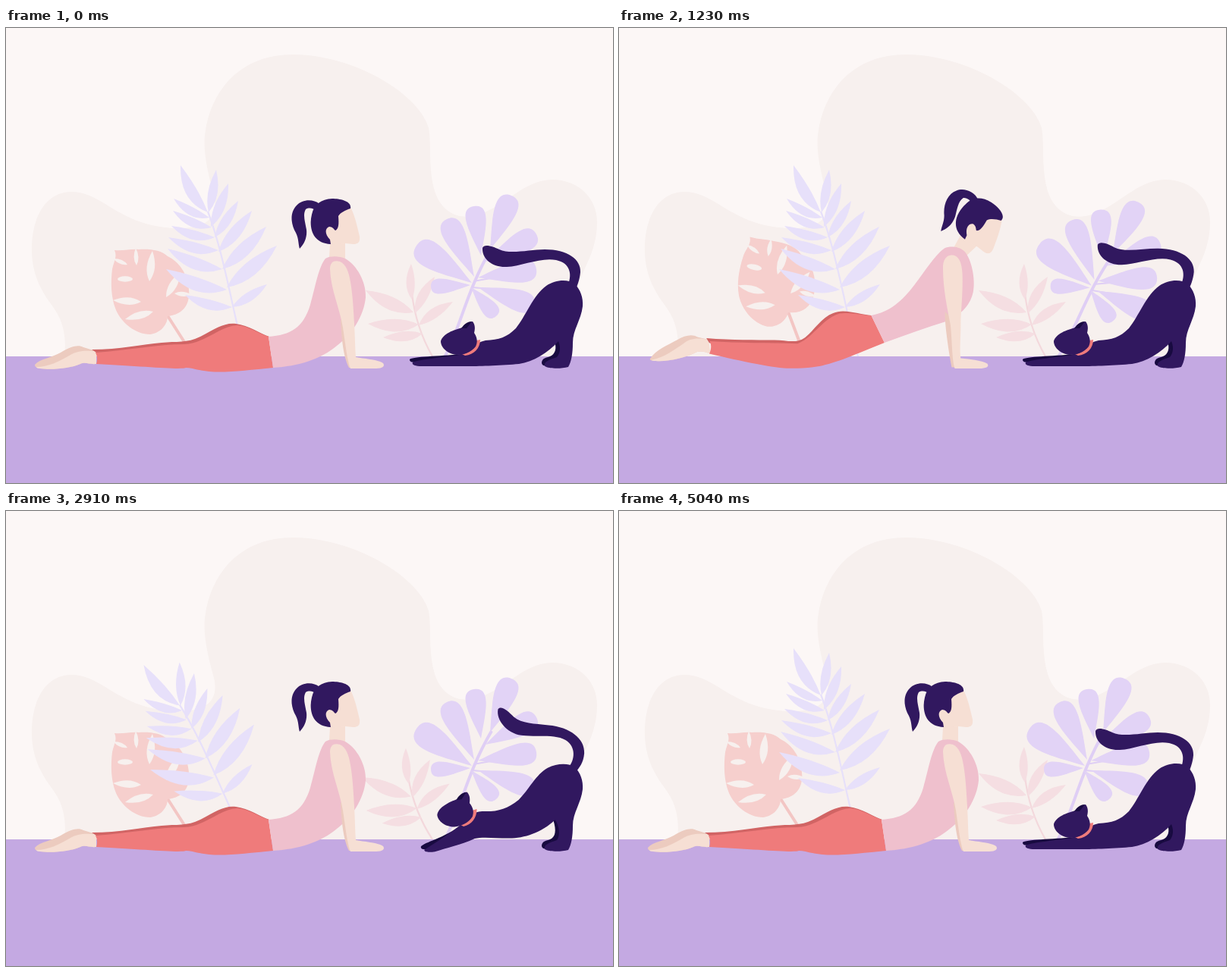
These frames come from a looping animation (800x600 px, 5070 ms). An HTML page:

```html
<!DOCTYPE html>
<html lang="en">
<head>
<meta charset="utf-8">
<title>Stretching together</title>
<style>
html, body { margin: 0; width: 100%; height: 100%; overflow: hidden; background: #fcf7f6 }
svg { display: block; width: 100%; height: 100% }
</style>
</head>
<body>
<svg viewBox="0 0 800 600">
  <path fill="#f7f0ee" d="M77 433C80 405 75 385 60 365C40 338 33 315 34 285C36 245 55 215 88 216C130 218 150 262 225 264C264 265 281 250 274 220C267 195 258 160 263 135C272 80 310 35 378 35C460 35 545 88 557 132C561 152 556 185 565 215C573 240 592 252 615 248C655 240 680 200 720 200C755 200 780 225 779 258C778 300 757 320 753 345L745 433Z"/>
  <g id="monstera" fill="#f6cfcd">
    <path d="M212 378L242 425" stroke="#f3c6c4" stroke-width="4"/>
    <path d="M143 293C155 294 165 291 175 292C190 291 205 293 213 301C228 308 240 325 241 345C243 362 235 378 213 380C213 390 205 402 190 404C170 404 152 388 145 372C138 355 138 335 140 318C142 308 147 302 143 293Z"/>
    <g id="cuts" fill="#f7f0ee"><ellipse cx="157" cy="331" rx="10" ry="3.7"/></g>
  </g>
  <g id="fern" fill="#e7e0fa">
    <path d="M315 433C300 380 288 300 266 242" fill="none" stroke="#e7e0fa" stroke-width="2.2"/>
  </g>
  <g id="sprig" fill="#f5dee2">
    <path d="M562 433C550 412 539 385 535 350" fill="none" stroke="#f3d8dc" stroke-width="2.2"/>
  </g>
  <g id="paddle" fill="#e2d3f6">
    <path d="M575 440C600 395 605 350 640 290" fill="none" stroke="#dfcef5" stroke-width="4"/>
    <path d="M614 342L650 345M616 334L650 328" fill="none" stroke="#dfcef5" stroke-width="2"/>
  </g>
  <path fill="#c4a9e2" d="M0 433H800V600H0Z"/>
  <g id="woman"></g>
  <g id="head">
    <path id="pony" fill="#31185f" d="M413 232C405 225 390 226 383 234C374 243 375 258 382 270C386 278 385 285 387 291C394 284 397 275 396 266C394 255 391 246 395 239C400 236 405 238 409 241Z"/>
    <path fill="#f6dfd4" d="M436 242L454 236C460 248 463 262 466 275C467 282 464 285 458 285L447 284L428 286L420 266Z"/>
    <path fill="#31185f" d="M454 238C456 228 440 225 430 225C415 226 406 232 403 246C399 262 403 284 428 285L427 279C420 272 420 264 426 262C430 262 432 265 434 267C438 265 439 260 438 248C441 243 448 240 454 238Z"/>
  </g>
  <g id="cat"></g>
  <g id="catHead">
    <path fill="#31185f" d="M573 413C576 403 590 398 602 395C605 391 609 388 615 387C619 392 618 398 617 402C621 408 622 414 619 420C613 428 603 431 594 431C583 430 573 422 573 413Z"/>
    <path fill="#180a40" d="M600 396C604 390 609 387 614 387L607 396Z"/>
  </g>
</svg>
<script>
const LOOP = 5070;
const $ = id => document.getElementById(id);

function addPath(parent, fill, d = '') {
  const el = document.createElementNS('http://www.w3.org/2000/svg', 'path');
  el.setAttribute('fill', fill);
  el.setAttribute('d', d);
  return parent.appendChild(el);
}

// A point at fraction k along root-tip, pushed sideways by s.
function along(x, y, X, Y, k, s) {
  const dx = X - x, dy = Y - y, n = s / Math.hypot(dx, dy);
  return `${(x + dx * k - dy * n).toFixed(1)} ${(y + dy * k + dx * n).toFixed(1)} `;
}

// Pointed leaf; a and b bend the two edges relative to its length.
function leaf([x, y, X, Y], a, b) {
  const len = Math.hypot(X - x, Y - y), at = s => along(x, y, X, Y, .43, s * len);
  return `M${x} ${y}Q${at(a)}${X} ${Y}Q${at(b)}${x} ${y}Z`;
}

// Round-tipped petal of width w.
function petal([x, y, X, Y, w]) {
  const at = (k, s) => along(x, y, X, Y, k, s * w);
  return `M${x} ${y}C${at(.45, .34)}${at(1, .88)}${X} ${Y}C${at(1, -.88)}${at(.45, -.34)}${x} ${y}Z`;
}

const rows = text => text.split(',').map(r => r.trim().split(' ').map(Number));
function leaves(id, text, a, b) {
  addPath($(id), $(id).getAttribute('fill'), rows(text).map(r => leaf(r, a, b)).join(''));
}

leaves('cuts', '172 313 171 290,189 334 193 294,160 312 141 304,178 361 141 359,194 374 157 384,211 355 230 322,222 350 245 352', .26, -.26);
leaves('fern', '266 243 230 181,268 250 221 225,271 263 220 241,275 276 218 261,280 293 214 276,285 318 213 291,291 345 211 318,298 368 236 352', .07, -.35);
leaves('fern', '267 243 277 187,270 262 293 205,275 276 306 228,280 295 324 241,285 318 343 262,291 342 357 287,298 368 344 338', .25, -.19);
leaves('sprig', '537 375 474 346,544 391 477 390,549 403 497 408', .2, -.3);
leaves('sprig', '535 358 534 311,539 376 565 328,544 392 589 361', .18, -.3);
addPath($('paddle'), '#e2d3f6', rows('614 336 541 287 36,617 328 581 252 31,626 300 617 235 28,638 292 666 221 31,632 308 699 272 30,622 329 699 318 31,622 342 696 366 30,613 342 646 380 22,612 339 560 341 21').map(petal).join(''));

const skin = '#f6dfd4', shade = '#eccbbf', dark = '#31185f', night = '#180a40', coral = '#ef7b7b';

// Each part: role, fill, resting pose, moved pose.
const parts = [
  // far foot, near foot
  ['woman', shade,
    'M38 444C45 436 60 435 72 428C85 420 95 417 102 421L115 425L119 443C110 444 105 440 98 443C85 449 60 451 45 449C39 448 38 446 38 444Z',
    'M42 433C50 420 65 412 78 405C88 399 97 398 104 402L118 405L121 424C113 420 110 420 104 421C90 429 65 436 50 435C44 435 42 435 42 433Z'],
  ['woman', skin,
    'M40 447C55 447 70 440 85 431C95 425 108 425 119 427L119 443C110 444 105 440 98 443C85 449 60 451 45 449C42 449 40 448 40 447Z',
    'M44 434C60 430 75 418 88 408C95 402 108 402 118 405L121 424C113 420 110 420 104 421C90 429 65 436 50 435C46 435 44 435 44 434Z'],
  // far leg, near leg
  ['woman', '#d16464',
    'M113 424C150 424 180 417 205 415C225 413 240 416 258 406C275 397 288 388 303 390C320 392 335 403 347 407L260 440L119 428Z',
    'M116 403C150 407 180 409 205 410C220 411 230 417 240 409C256 394 265 368 292 367C305 367 315 368 327 368L235 440L119 410Z'],
  ['woman', coral,
    'M118 428C160 425 200 417 235 417C262 416 282 393 305 392C320 393 335 404 346 407L352 448C320 451 290 455 268 453C255 452 245 448 237 448C230 451 180 446 119 443C121 438 120 432 118 428Z',
    'M120 407C160 412 195 414 235 416C255 405 268 372 290 370C305 368 315 369 327 368L349 402C320 417 290 435 268 442C250 447 240 449 225 449C200 449 160 438 119 424C122 418 123 412 120 407Z'],
  // neck, top
  ['woman', skin,
    'M428 270L426 302C433 308 443 306 447 304L447 284L460 270Z',
    'M466 262L448 283C452 292 458 297 462 299L483 287L490 275Z'],
  ['woman', '#efc0cd',
    'M346 407C375 405 392 395 401 365C408 340 412 315 421 304C428 300 440 301 447 304C462 312 475 335 474 355C472 380 455 405 436 419C415 437 385 446 352 448Z',
    'M327 368C350 362 365 347 385 328C402 312 418 293 432 285C440 282 452 283 459 291C466 303 468 330 464 345C460 358 452 366 430 374C400 378 375 389 349 402Z'],
  // far arm, near arm
  ['woman', shade,
    'M441 385C442 400 443 430 452 448L458 448L452 380Z',
    'M425 370C424 385 430 420 433 447L440 448L436 385Z'],
  ['woman', skin,
    'M427 318C427 308 433 306 440 308C448 311 452 322 454 335C457 352 458 372 459 390C460 408 460 420 461 434C470 436 490 437 497 442C500 446 496 449 488 449L454 449C450 440 447 415 444 395C440 370 428 345 427 318Z',
    'M427 318C426 303 432 296 440 296C448 296 452 305 452 320C452 345 448 370 447 385C447 405 444 425 446 436C460 437 475 439 481 443C484 447 478 449 470 449L438 449C434 435 436 410 434 390C429 365 427 345 427 318Z'],
  // far legs
  ['cat', night,
    'M532 437C536 433 570 433 600 430L605 438C580 438 555 438 541 441C534 441 532 440 532 437Z',
    'M555 446C560 438 580 432 603 403L612 412C598 430 582 442 565 449C558 450 555 449 555 446Z'],
  ['cat', night,
    'M706 441C707 435 712 435 717 433C724 430 726 422 723 414L732 410L732 434C722 436 715 438 712 445C708 446 706 444 706 441Z',
    'M706 441C707 435 712 435 717 433C724 430 726 422 720 403L732 400L732 434C722 436 715 438 712 445C708 446 706 444 706 441Z'],
  // tail, body
  ['tail', dark,
    'M628 290C630 284 642 288 650 292C665 299 690 292 710 292C740 292 758 305 757 322C756 332 753 340 750 346L741 338C746 325 744 310 725 306C705 302 680 314 660 315C642 316 627 305 628 290Z',
    'M660 245C665 240 673 250 680 260C688 270 700 274 718 277C745 281 766 297 765 318C764 332 757 338 750 345L741 339C752 330 756 312 745 300C732 289 710 290 690 285C670 280 656 259 660 245Z'],
  ['cat', dark,
    'M536 441C548 436 575 435 598 431C605 425 618 415 632 412C650 411 660 408 672 396C685 380 695 352 712 340C725 331 742 331 750 338C757 345 761 356 760 367C758 385 747 398 747 415C747 430 745 440 741 447C730 450 715 449 710 446C708 440 717 437 726 434C731 428 731 420 728 413C715 428 695 440 676 443C655 445 625 446 610 446C590 446 565 446 548 446C540 446 534 444 536 441Z',
    'M560 450C575 439 590 420 602 403C607 390 615 386 625 387C645 389 660 385 678 372C692 360 700 345 715 338C728 333 742 333 750 338C757 345 761 356 760 367C758 385 747 398 747 415C747 430 745 440 741 447C730 450 715 449 710 446C708 440 717 437 726 434C731 428 728 412 721 404C700 423 675 427 655 425C640 424 630 420 622 424C605 437 590 443 575 451C567 453 560 453 560 450Z'],
  // collar
  ['cat', coral,
    'M620 412C618 422 612 428 601 430L605 432C617 431 625 422 625 411Z',
    'M612 385C611 395 606 402 598 405L602 407C612 404 618 395 618 383Z']
].map(([role, fill, from, to]) => ({
  role, from, goal: to.match(/[\d.]+/g).map(Number),
  el: addPath($(role === 'woman' ? 'woman' : 'cat'), fill, from)
}));

function morph({ el, from, goal }, p) {
  let i = 0;
  el.setAttribute('d', from.replace(/[\d.]+/g, n => (+n + (goal[i++] - n) * p).toFixed(2)));
}

// Smooth rise and fall between start and start + length.
function pulse(t, start, length) {
  const u = (t - start) / length;
  return u > 0 && u < 1 ? Math.sin(Math.PI * u) ** 2 : 0;
}
const ease = u => (1 - Math.cos(Math.PI * Math.min(1, Math.max(0, u)))) / 2;
const spin = (id, angle, x, y, dx = 0, dy = 0) =>
  $(id).setAttribute('transform', `translate(${dx} ${dy}) rotate(${angle} ${x} ${y})`);

function draw() {
  const t = performance.now() % LOOP;
  spin('monstera', 12.2 * pulse(t, 0, 2250), 242, 425);
  spin('paddle', 9 * pulse(t, 630, 2250), 575, 440);
  spin('fern', -12.2 * pulse(t, 1840, 2530), 315, 433);
  spin('sprig', -11.1 * pulse(t, 2430, 2600), 562, 433);

  const lift = ease(t / 700) * (1 - ease((t - 980) / 700));
  const rise = 1.064 * pulse(t, 1670, 1730);
  const flick = .09 * pulse(t, 0, 2250) + .05 * pulse(t, 4000, 1070);
  const pose = { woman: lift, cat: rise, tail: rise + flick };
  for (const part of parts) morph(part, pose[part.role]);

  spin('head', 47 * lift, 429, 268, 52 * lift, -4 * lift);
  spin('pony', -12 * lift - 3 * (pulse(t, 1680, 1230) + pulse(t, 2910, 2130)), 408, 235);
  spin('catHead', -9 * rise, 597, 410, -8 * rise, -23 * rise);
  requestAnimationFrame(draw);
}
draw();
</script>
</body>
</html>
```
